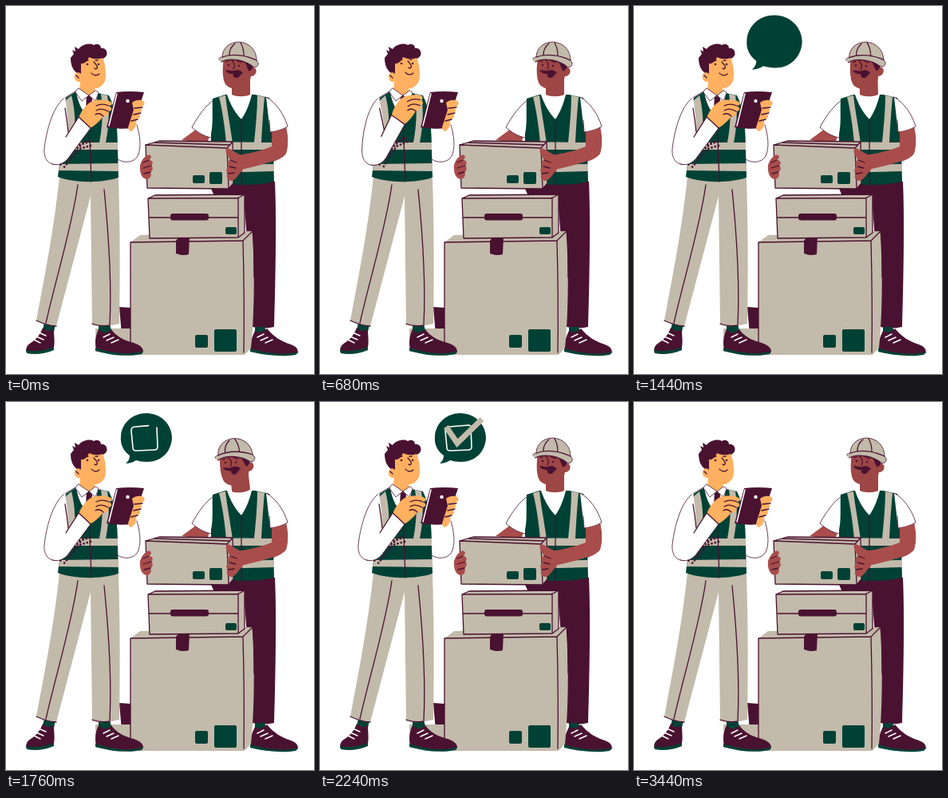
Animation of 386x461 px, one loop 4 s. Source, as an HTML page:

```html
<!DOCTYPE html>
<html lang="en">
<head>
<meta charset="utf-8">
<title>Stock check</title>
<style>
html, body { margin: 0; width: 100%; height: 100%; overflow: hidden; background: #fff; }
svg { display: block; width: 100vw; height: 100vh; }
.plum { fill: #4a1231; }
.green { fill: #004135; }
.beige { fill: #c2baaa; }
.white { fill: #fff; }
.peach { fill: #ffb060; }
.brown { fill: #a84d4b; }
.dark { fill: #9c4645; }
.line, .thin, .lace, .dots { fill: none; stroke: #4a1231; stroke-width: 1.3; stroke-linecap: round; stroke-linejoin: round; }
.thin { stroke-width: .8; }
.lace { stroke: #fff; stroke-width: 1.5; }
.dots { stroke-width: 2.8; stroke-dasharray: 0 4.4; }
</style>
</head>
<body>
<svg viewBox="0 0 386 461">
  <!-- worker with the boxes -->
  <g>
    <path class="plum" d="M253 220H337C339 260 338 340 336 402Q322 405 309 402L302 292L298 240H262Z"/>
    <path class="plum" d="M142 377L156 378V412H145Z"/>
    <path class="beige" d="M112 404H157V433H113Z"/>
    <path class="green" d="M312 402L324 402L328 412L312 413Z"/>
    <path class="plum" d="M312 407C308 415 305 425 307 430C325 435 348 439 364 436C368 432 365 427 357 424C345 420 336 415 327 404C322 409 317 410 312 407Z"/>
    <path class="green" d="M306 429C325 435 348 438 367 433L363 437C345 440 322 437 306 433Z"/>
    <path class="lace" d="M315 415L323 411M319 419L328 415M325 422L334 418"/>
    <path class="brown" d="M243 151L220 168L252 172L257 158Z"/>
    <path class="white" d="M262 117C251 123 240 139 233 152C241 159 248 163 257 165Z"/>
    <path class="thin" d="M262 117C251 123 240 139 233 152C241 159 248 163 257 165"/>
    <path class="brown" d="M330 155L351 151C354 164 354 176 351 185C346 192 332 197 310 202L288 207L284 188L333 176Z"/>
    <path class="green" d="M259 116L275 111H312L330 115C335 135 335 160 335 180L336 220C312 226 280 224 257 222V160C260 145 258 130 259 116Z"/>
    <path class="beige" d="M267 114L275 112C277 130 281 150 284 172H276C274 150 271 130 267 114ZM315 112L324 114C322 135 321 153 320 171H311C313 150 315 130 315 112ZM258 170L334 171V180L258 180ZM258 199L336 198V207L258 209Z"/>
    <path class="white" d="M277 111L308 111C305 123 301 133 295 142C287 134 281 123 277 111Z"/>
    <path class="line" d="M295 142V224"/>
    <path class="white" d="M326 114C339 121 349 137 353 151C346 155 339 157 331 158Z"/>
    <path class="thin" d="M326 114C339 121 349 137 353 151C346 155 339 157 331 158L330 143"/>
    <path class="brown" d="M333 158L351 153C354 166 353 178 350 186C342 193 326 198 290 206L284 188C305 185 321 181 333 176Z"/>
    <g id="head">
      <path class="dark" d="M283 95L306 86V111C300 114 289 114 283 111Z"/>
      <path class="dark" d="M273 64C271 78 271 91 275 98C280 105 295 106 302 100C306 96 306 91 307 88C312 88 315 83 313 79C311 76 308 77 306 79L307 64Z"/>
      <path class="plum" d="M299 66H311L309 78L305 82C302 78 301 72 299 70Z"/>
      <path class="plum" d="M286 81C290 79 295 81 297 84C294 85 294 88 290 90C286 90 284 88 285 85C280 85 276 83 275 80C279 80 283 82 286 81Z"/>
      <path class="line" d="M283 68C287 72 287 76 285 79M276 70L279 69M290 69L295 71"/>
      <circle class="plum" cx="279" cy="74" r="1.2"/><circle class="plum" cx="292" cy="75" r="1.2"/>
      <path class="beige" d="M271 64C271 53 280 45 292 45C306 46 314 56 314 68L316 71C317 75 313 78 309 76C300 68 280 64 270 70C266 69 266 65 271 64Z"/>
      <path class="line" d="M309 76C300 68 280 64 270 70M271 64C285 59 302 62 314 68M287 47C282 51 280 56 280 61M294 46C297 51 298 56 298 62"/>
      <path class="thin" d="M267 67C266 65 269 64 271 64C271 53 280 45 292 45C306 46 314 56 314 68L316 71C317 75 313 78 309 76"/>
    </g>
  </g>

  <!-- boxes -->
  <g>
    <path class="beige" d="M156 296L168 287L309 282C312 330 311 390 307 428L299 437H156Z"/>
    <path class="line" d="M156 296L297 294L309 282C311 300 311 320 311 340M297 294Q299 370 298 434M156 296V434"/>
    <path class="plum" d="M217 289L230 288L229 311C224 313 218 312 213 310V294Z"/>
    <rect class="green" x="237" y="412" width="16" height="16" rx="2"/>
    <rect class="green" x="261" y="405" width="28" height="28" rx="2"/>
    <path class="beige" d="M178 241L187 236H299V284L291 290L180 291Z"/>
    <path class="line" d="M178 241L187 237L299 236L291 240.500ZM291 240V290L299 284V236M178 241L180 291L291 290M180 265H291"/>
    <rect class="plum" x="206" y="260" width="48" height="8.500" rx="3"/>
    <rect class="green" x="275" y="277" width="14" height="9" rx="2"/>
    <path class="beige" d="M175 174L192 169L284 170L285 222L279 229L177 228Z"/>
    <path class="line" d="M175 174L192 169L284 170L277 178M175 174L277 178L279 229L285 222L284 170M175 174L177 228L279 229M186 171L280 174"/>
    <rect class="green" x="234" y="212" width="15" height="10" rx="2"/>
    <rect class="green" x="255" y="208" width="16" height="15" rx="2"/>
    <path class="brown" d="M177 187C182 185 184 190 179 193C184 193 185 197 182 200C185 202 184 207 181 208C183 212 181 216 177 217C170 217 167 208 168 199C170 193 173 189 177 187Z"/>
    <path class="line" d="M179 193L172 196M182 200L172 203M181 208L173 210"/>
    <path class="brown" d="M277 178C281 178 287 184 295 187L297 205C291 211 288 218 283 219C278 219 275 214 278 210C275 207 276 203 280 201C276 198 277 194 281 193C278 188 273 182 277 178Z"/>
    <path class="line" d="M281 193L289 196M280 201L288 203M278 210L286 209"/>
  </g>

  <!-- worker with the tablet -->
  <g>
    <path class="green" d="M48 396L62 399L60 408L46 406ZM116 399L130 398L133 411L116 412Z"/>
    <path class="plum" d="M46 403C51 408 56 408 60 405C60 415 62 424 59 430C48 434 35 436 26 434C24 430 26 425 31 422C38 418 43 411 46 403Z"/>
    <path class="green" d="M25 431C36 434 50 431 60 427V431C49 436 36 437 26 435Z"/>
    <path class="lace" d="M41 409L50 413M38 414L47 418M35 418L43 422"/>
    <path class="plum" d="M116 405C121 411 128 410 132 405C138 414 148 419 160 422C169 425 174 430 171 435C155 440 130 436 113 430C111 422 112 413 116 405Z"/>
    <path class="green" d="M112 428C132 435 155 438 172 432L170 436C150 440 129 437 112 432Z"/>
    <path class="lace" d="M122 415L130 411M126 419L135 415M132 422L141 418"/>
    <path class="beige" d="M67 214L141 216C143 280 143 340 142 398Q124 403 108 400L106 238L63 401Q50 400 38 394C49 335 60 280 67 214Z"/>
    <path class="line" d="M90 224C83 275 63 340 50 397M123 230C128 280 133 340 130 399M38 394Q50 400 63 401M108 398Q119 402 130 400"/>

    <path class="white" d="M128 111C140 116 148 128 160 140C167 155 170 178 165 188C160 197 147 197 140 192L132 160Z"/>
    <path class="thin" d="M164 149C168 162 170 178 165 188C160 197 147 197 140 192"/>
    <path class="white" d="M91 103L70 116L74 170L130 160V112L112 106Z"/>
    <path class="green" d="M75 115L88 107C90 122 97 134 104 141C110 132 114 121 115 109L129 112C138 130 140 155 140 180L141 215C120 222 85 222 65 214C67 195 71 180 75 160C71 145 71 128 75 115Z"/>
    <path class="beige" d="M74 119L82 112C87 130 87 152 86 172H75V150C72 139 72 127 74 119ZM119 110L127 112C130 130 129 152 125 171H117C121 150 122 130 119 110ZM72 171L140 171V180H70ZM67 198L141 197V207L66 206Z"/>
    <path class="plum" d="M101 111L107 111L108 116L107 132L104 140L100 130Z"/>
    <path class="line" d="M104 141L107 220"/>
    <path class="plum" d="M89 84C83 80 81 72 81 65L85 60L83 55L87 57L86 51L91 54C95 48 105 46 110 49C115 46 119 49 119 53C124 52 128 57 126 62C123 67 117 68 112 66L93 86Z"/>
    <path class="peach" d="M94 72C98 73 102 69 104 64C110 67 116 67 121 65C125 73 126 88 124 94C121 101 114 104 111 103L112 108L103 112L92 105L93 95C88 96 85 91 86 87C87 83 91 82 94 85Z"/>
    <path class="line" d="M88 87L91 90"/>
    <g id="face">
      <path class="line" d="M110 70C113 73 115 76 114 78C113 79 112 79 111 78M107 84C109 87 114 88 117 85M99 69L103 68M112 68L115 68"/>
      <circle class="plum" cx="102" cy="73" r="1.300"/><circle class="plum" cx="116" cy="73" r="1.300"/>
    </g>
    <path class="white" d="M91 103L104 112L95 119L87 108ZM112 106L104 112L112 119L116 109Z"/>
    <path class="thin" d="M91 103L104 112L95 119L87 108ZM112 106L104 112L112 119L116 109ZM87 107L72 116"/>

    <path class="plum" d="M138 108Q155 106 173 108L158 153Q142 155 126 152Z"/>
    <path class="lace" d="M139 110L129 150"/>
    <circle class="white" cx="152.500" cy="119" r="2.200"/>
    <path class="peach" d="M158 121C163 117 171 117 173 120C175 123 172 126 167 127C172 129 171 133 166 134C170 137 168 142 163 142C165 150 160 157 155 157L153 152L160 130Z"/>
    <path class="line" d="M171 127L161 128M169 134L160 136M165 142L157 144"/>

    <g id="arm">
      <path class="white" d="M74 114C62 124 51 152 48 179C47 192 54 200 64 198L77 180C80 160 77 135 74 114Z"/>
      <path class="thin" d="M72 116C60 126 51 152 48 179C47 192 54 200 64 198"/>
      <path class="line" d="M74 128C76 140 77 148 78 158"/>
      <g id="fore">
        <path class="dots" d="M105 170L90 174L68 199M106 175L92 179L72 203M100 170L86 181L66 193"/>
        <path class="peach" d="M91 140C95 130 101 123 108 119C117 117 126 117 131 120C135 122 132 125 129 125C134 128 133 132 128 132C130 136 126 139 122 138C117 145 111 150 105 153Z"/>
        <path class="line" d="M129 125C122 122 117 123 113 125M128 132C121 128 116 129 113 131M122 138C118 134 115 134 112 136"/>
        <path class="white" d="M54 194C62 201 70 199 77 192L106 153Q99 146 91 139L75 164L58 180Z"/>
        <path class="line" d="M75 164L91 139Q99 146 106 153"/>
        <path class="thin" d="M106 153L77 192C71 198 65 200 58 198"/>
      </g>
    </g>
  </g>

  <g id="bubble">
    <path class="green" d="M155 67C147 61 143 53 144 43C145 26 159 14 176 14C194 14 208 28 208 45C207 63 194 75 177 75C171 75 167 74 163 73Q157 77 150 77Q155 73 155 67Z"/>
    <path id="square" pathLength="1" fill="none" stroke="#fff" stroke-width="1.600" stroke-linecap="round" d="M189 32L190 56Q190 60 186 60L163 61Q159 61 159 57L157 36Q157 31 162 31L186 29Q189 29 189 32"/>
    <path id="tick" fill="none" stroke="#c2baaa" stroke-width="7" d="M158 31L172 51.500L203 21.500"/>
  </g>
</svg>
<script>
const LOOP = 4000, STEP = 40;
const el = id => document.getElementById(id);
const set = (id, transform) => el(id).setAttribute('transform', transform);
const span = (t, a, b) => Math.min(1, Math.max(0, (t - a) / (b - a)));
const ease = p => p * p * (3 - 2 * p);
const there = p => Math.sin(Math.PI * p) ** 2;
const pop = (p, peak) => p < .6 ? peak * ease(p / .6) : peak - (peak - 1) * ease((p - .6) / .4);

function show(id, on) {
  el(id).style.visibility = on ? 'visible' : 'hidden';
}

function grow(id, size, x, y) {
  show(id, size > 0);
  set(id, `translate(${x} ${y}) scale(${size}) translate(${-x} ${-y})`);
}

function trace(id, p) {
  show(id, p > 0);
  el(id).setAttribute('stroke-dasharray', p < 1 ? `${p} 2` : 'none');
}

function draw(t) {
  const tap = there(span(t, 400, 1080));
  set('arm', `rotate(${-4.7 * tap} 78 120)`);
  set('fore', `rotate(${-3.4 * tap} 58 190)`);
  set('face', `translate(0 ${-tap})`);
  set('head', `rotate(${-6.5 * there(span(t, 1280, 2240))} 294 110)`);

  const open = t < 2400 ? span(t, 1280, 1600) : span(t, 3440, 3120);
  grow('bubble', pop(open, 1.17), 175.5, 45);
  trace('square', open && ease(span(t, 1520, 1820)));
  grow('tick', open && pop(span(t, 1840, 2160), 1.2), 180, 38);
}

const start = performance.now();
function frame() {
  const t = (performance.now() - start) % LOOP;
  draw(Math.floor(t / STEP) * STEP);
  requestAnimationFrame(frame);
}
frame();
</script>
</body>
</html>
```
